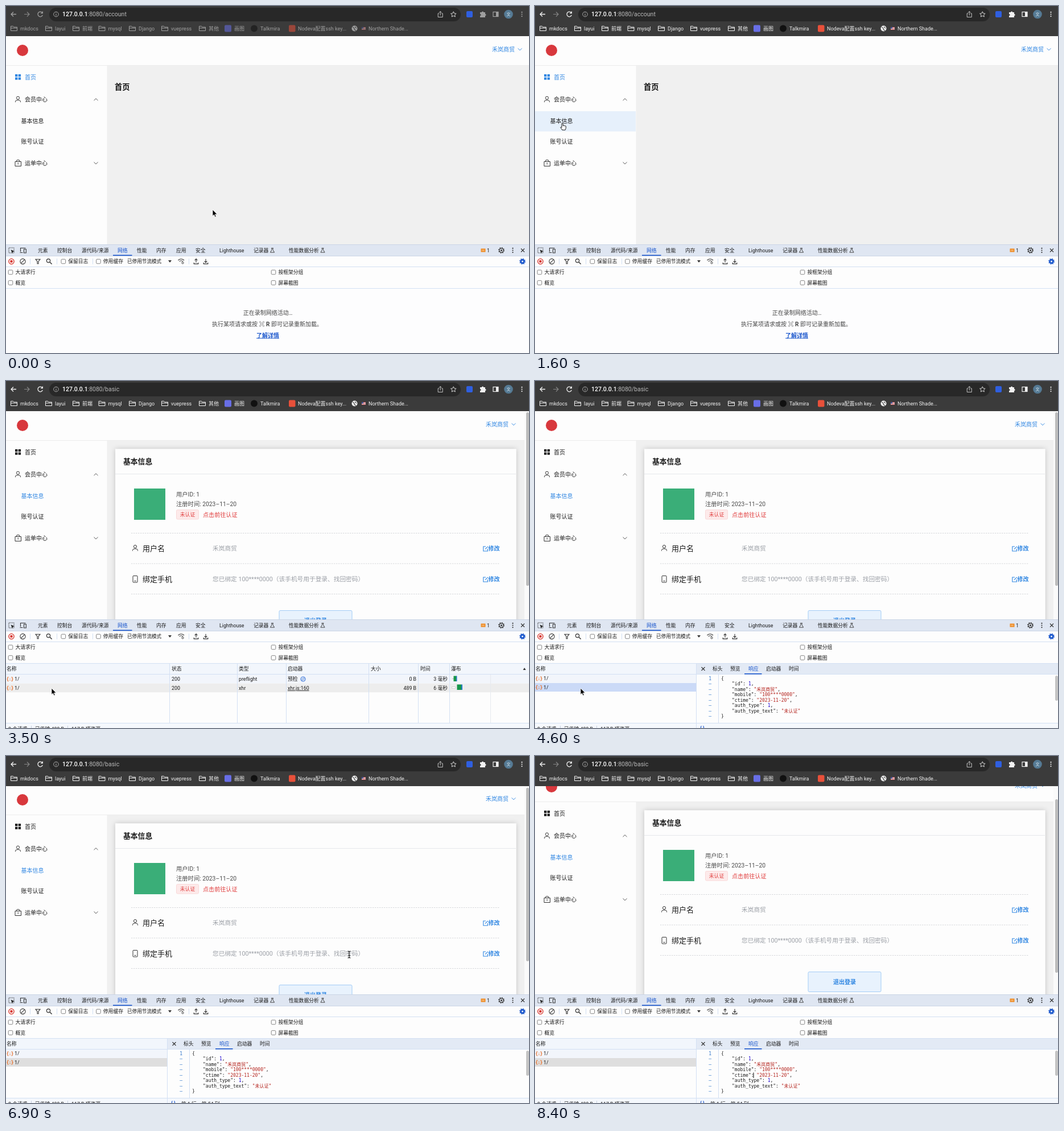
Write an HTML page that moves like this. It is 919x610 px and loops after 8500 ms.

```html
<!DOCTYPE html>
<html lang="zh-CN">
<head>
<meta charset="utf-8">
<title>Account page</title>
<style>
html, body { margin: 0; width: 100%; height: 100%; overflow: hidden; background: #fff; }
svg { display: block; }
text { font-family: Roboto, "Noto Sans CJK SC", "Noto Sans CJK", "DejaVu Sans", sans-serif; white-space: pre; }
.mono text { font-family: "DejaVu Sans Mono", "Noto Sans CJK SC", "Noto Sans CJK", monospace; }
</style>
</head>
<body>
<svg id="stage" width="919" height="610" viewBox="0 0 919 610"></svg>
<script>
const BLUE = '#2f86e2', DEV_BLUE = '#1a56cc', INK = '#1a1a1a', RULE = '#d3e0f3', PAPER = '#fdfdfd';
const COMPANY = '禾岚商贸', PHONE = '100****0000';
const LOOP = 8500, STEP = 100;

// Drawing helpers: text is placed by its vertical centre.
const text = (x, y, s, size = 8.8, fill = INK, extra = '') =>
  `<text x="${x}" y="${y + size * .36}" font-size="${size}" fill="${fill}" ${extra}>${s}</text>`;
const rect = (x, y, w, h, fill, extra = '') =>
  `<rect x="${x}" y="${y}" width="${w}" height="${h}" fill="${fill}" ${extra}/>`;
const line = (d, stroke = INK, width = 1, extra = '') =>
  `<path d="${d}" fill="none" stroke="${stroke}" stroke-width="${width}" ${extra}/>`;
const shape = (d, fill) => `<path d="${d}" fill="${fill}"/>`;
const circle = (x, y, r, fill, extra = '') => `<circle cx="${x}" cy="${y}" r="${r}" fill="${fill}" ${extra}/>`;
const ring = (x, y, r, stroke, width = 1) => circle(x, y, r, 'none', `stroke="${stroke}" stroke-width="${width}"`);
const group = (id, body, extra = '') => `<g id="${id}" ${extra}>${body}</g>`;
const BOLD = 'font-weight="700"', MEDIUM = 'font-weight="500"';
const END = 'text-anchor="end"', MIDDLE = 'text-anchor="middle"';

const chevron = (x, y, dir, color) => line(`M${x - 3.5} ${y - 1.6 * dir}l3.5 ${3.4 * dir}l3.5 ${-3.4 * dir}`, color, .9);
const cross = (x, y) => line(`M${x - 3} ${y - 3}l6 6m0-6l-6 6`, '#333', 1.1);
const person = (x, y) => ring(x, y - 2.4, 2.6, '#333') + line(`M${x - 4.5} ${y + 5.2}v-1q0-2.6 3-2.6h3q3 0 3 2.6v1`, '#333');
const gear = (x, y, color, body = 'none') => circle(x, y, 3.6, body, `stroke="${color}" stroke-width="1.3"`) +
  circle(x, y, 1.5, body === 'none' ? color : PAPER) +
  circle(x, y, 4.7, 'none', `stroke="${color}" stroke-width="1.4" stroke-dasharray="1.8 1.89"`);
const dots = (x, y, color) => [-3.6, 0, 3.6].map(d => circle(x, y + d, 1.05, color)).join('');
const checkbox = (x, y, label) => rect(x, y - 3.8, 7.6, 7.6, '#fff', 'rx="1.5" stroke="#777" stroke-width=".9"') +
  text(x + 12.2, y, label);
const flask = (x, y) => line(`M${x - 2} ${y - 3.7}h4m-3 0v3l-2.6 4.3h7.2l-2.6-4.3v-3`, '#333', .9);
const transfer = (x, y, up) => line(`M${x - 3.8} ${y + 2}v2.4h7.6v-2.4M${x} ${y + 2}v-6.3` +
  (up ? 'l-2.4 2.4m2.4-2.4l2.4 2.4' : `M${x - 2.4} ${y - .4}l2.4 2.4l2.4-2.4`), '#333', 1.1);

function browserBar() {
  const W = '#f1f1f1';
  const folders = [[8, 'mkdocs'], [69, 'layui'], [117, '前端'], [162.5, 'mysql'], [216, 'Django'], [273, 'vuepress'], [339, '其他']];
  const folder = ([x, label]) =>
    line(`M${x + .5} 43.5v-8h4l1.3 1.6h5.7v6.4zM${x + .5} 38.8h11`, W) + text(x + 17, 39.5, label, 9, W);
  const controls =
    line('M18 14.5h-9m4-4l-4 4l4 4', W, 1.3) +
    line('M64 12.3a4.3 4.3 0 1 0 .3 3.7M64.3 9.5v3.2h-3.2', W, 1.3) +
    shape('M833 11h3a1.6 1.6 0 0 1 3.2 0h2.8v3a1.6 1.6 0 0 1 0 3.2v2.8h-9v-2.8a1.6 1.6 0 0 0 0-3.2z', W) +
    rect(856, 10.5, 9, 8, 'none', `stroke="${W}" stroke-width="1.2"`) + rect(861, 10.5, 4, 8, W) +
    dots(906.5, 14.5, W) + folders.map(folder).join('') +
    rect(384, 33.5, 12, 12, '#686ee6', 'rx="2"') + text(401, 39.5, '画图', 9, W) +
    circle(436, 39.5, 6, '#111') + text(447, 39.5, 'Talkmira', 9, W) +
    rect(497, 33.5, 11.5, 12, '#e8503a', 'rx="2"') + text(513, 39.5, 'Nodeva配置ssh key...', 9, W) +
    circle(612.5, 39.5, 5, W) + line('M609 37q3 1 3 3t3 3m-1-7q-1 2 2 3', '#444', 1.2) +
    rect(625, 37, 7, 5, '#e9dede') + line('M625 37.5h7m-7 2h7m-7 2h7', '#c84850', .9) + rect(625, 37, 3, 2.6, '#465a9c') +
    text(637, 39.5, 'Northern Shade...', 9, W);
  return rect(0, 0, 919, 53, '#3b3b3b') + rect(76, 3, 723, 24, '#282828', 'rx="12"') +
    line('M32 14.5h9m-4-4l4 4l-4 4', '#858585', 1.2) + group('controls', controls) +
    ring(88, 14.5, 4.3, '#aaa') + line('M88 14v3m0-5.2v1', '#aaa', 1.1) +
    `<text x="99" y="18.2" font-size="10.5" fill="#b8b8b8"><tspan fill="#fff" ${MEDIUM}>127.0.0.1</tspan>:8080<tspan id="path"></tspan></text>` +
    line('M761 13h-1.8v6.5h8v-6.5h-1.8m-2.2 3.5v-7m-2.2 2.2l2.2-2.2l2.2 2.2', '#c5c5c5') +
    line('M786.3 9.8l1.4 3.1l3.4.4l-2.5 2.3l.7 3.4l-3-1.7l-3 1.7l.7-3.4l-2.5-2.3l3.4-.4z', '#d5d5d5') +
    rect(809, 9, 11, 11, '#2f5fe0', 'rx="2"') +
    circle(883, 14.5, 7.8, '#557a94') + text(883, 14.5, '文', 7, '#dde7ee', MIDDLE);
}

function sidebar() {
  return rect(0, 105, 177, 420, PAPER) + rect(0, 185, 177, 35.5, '#e6f0fb', 'id="hover"') +
    group('homeItem', [[16, 120], [21.7, 120], [16, 125.5], [21.7, 125.5]].map(([x, y]) => rect(x, y, 4.4, 4.2, 'currentColor')).join('') +
      text(33, 125, '首页', 10, 'currentColor')) +
    person(21, 164) + text(33, 164.5, '会员中心', 10) + chevron(158, 164.5, -1, '#444') +
    group('basicItem', text(26.5, 202.5, '基本信息', 10, 'currentColor')) + text(26.5, 238.5, '账号认证', 10) +
    line('M16 273.5h10.5v8h-10.5zM18 273.5l1.2-2.7h4l1.2 2.7M21.2 275.5v3.2', '#333') +
    text(33, 276.5, '运单中心', 10) + chevron(158, 276, 1, '#444');
}

function card() {
  const GREY = '#9b9fa6', BODY = '#4a4a4a', RED = '#e03c3c';
  const note = '（该手机号用于登录、找回密码）';
  const dash = y => line(`M220 ${y}H868`, '#d5d7da', 1, 'stroke-dasharray="2.4 1.6"');
  const edit = y => line(`M843 ${y - 3.5}h-4.2v8h7.6v-4m-4.4.6l4.8-4.8`, BLUE, 1.1) + text(847.5, y, '修改', 10, BLUE, BOLD);
  return rect(192, 119.5, 704.5, 420, PAPER, 'filter="url(#shadow)"') +
    text(206, 141.5, '基本信息', 12.8, INK, BOLD) + line('M192 163.5H896', '#e6e8eb') +
    rect(225, 189, 55, 55, '#3aae78') +
    group('empty', text(299, 199, '用户ID:', 10.3, BODY) + text(299, 216.5, '注册时间:', 10.3, BODY) +
      rect(299, 227, 14, 16, '#fdeaea', 'rx="2"') + text(320, 235, '点击前往认证', 10.1, RED) +
      text(363, 348.5, '您已绑定 ' + note, 10.7, GREY)) +
    group('filled', text(299, 199, '用户ID: 1', 10.3, BODY) + text(299, 216.5, '注册时间: 2023–11–20', 10.3, BODY) +
      rect(299.5, 226.5, 39, 16.5, '#fdeaea', 'rx="2" stroke="#f9d8d8"') + text(319, 235, '未认证', 8.8, RED, MIDDLE) +
      text(346, 235, '点击前往认证', 10.1, RED) +
      text(363, 294.5, COMPANY, 10.7, GREY) + text(363, 348.5, `您已绑定 ${PHONE}${note}`, 10.7, GREY)) +
    dash(267.5) + person(227, 293.5) + text(240, 294.5, '用户名', 13) + edit(294.5) +
    dash(321) + rect(223, 342.5, 8, 11.5, 'none', 'stroke="#333" rx="1"') + line('M225.5 351.5h3', '#333') +
    text(240, 348.5, '绑定手机', 13) + edit(348.5) + dash(374.5) +
    rect(480, 403.5, 128, 35, '#e8f2fd', 'rx="2" stroke="#a3ccf6"') + text(544, 421, '退出登录', 10, BLUE, `${MIDDLE} ${BOLD}`) +
    group('mask', rect(192, 119.5, 704.5, 420, PAPER, 'fill-opacity=".9"') +
      `<g id="spinner"><circle id="arc" r="12.4" fill="none" stroke="${BLUE}" stroke-width="1.5" stroke-linecap="round" pathLength="125.6"/></g>`);
}

function page() {
  return rect(0, 53, 919, 500, PAPER) + rect(177.5, 104, 741.5, 420, '#f0f0f0') + line('M0 104.5H919', '#ececec') +
    circle(29, 78, 10, '#d8383d') +
    group('account', text(854, 76.5, COMPANY, 10, BLUE) + chevron(903, 76, 1, BLUE)) + sidebar() +
    group('home', text(191, 142, '首页', 13.2, '#111', BOLD)) + group('basic', card());
}

function devTools() {
  const tabs = [[56, '元素'], [90, '控制台'], [133, '源代码/来源'], [230, '性能'], [264, '内存'], [299, '应用'], [333, '安全'],
    [375, 'Lighthouse'], [435, '记录器'], [497, '性能数据分析']];
  return rect(0, 419, 919, 191, PAPER) + rect(0, 419, 919, 20.5, '#dfe6f2') + line('M0 419.5H919M0 439.5H919', '#cbd5e6') +
    rect(5, 425, 9, 9, 'none', 'stroke="#333" stroke-dasharray="1.6 1.2"') + shape('M8.5 428.5l6.5 2.5l-2.7 1.1l-1.2 2.8z', '#222') +
    line('M24.5 433.5h5m-4-1.5v-6.5h9M31.5 427.5h3.8v6.5h-3.8z', '#333', 1.1) +
    tabs.map(([x, s]) => text(x, 429.5, s)).join('') + text(196, 429.5, '网络', 8.8, DEV_BLUE, MEDIUM) +
    rect(188, 437.5, 33.5, 1.6, DEV_BLUE) + flask(468, 429.5) + flask(556.5, 429.5) +
    rect(834.5, 426.5, 8, 6, '#ef8a20') + line('M837 428.3v2.4m2.6-2.4v2.4', '#fff', .8) + text(845, 430, '1') +
    gear(870.5, 429.5, '#333') + dots(890.5, 429.5, '#333') + cross(908, 429.5) +
    ring(9.5, 449, 4.6, '#d5281f', 1.3) + rect(7.5, 447, 4, 4, '#d5281f') +
    ring(29.5, 449, 4.6, '#333', 1.1) + line('M26.3 452.2l6.4-6.4', '#333', 1.1) +
    line('M52 445.2h8l-3 3.8v4h-2v-4z', '#333', 1.1) + ring(74.5, 447.8, 3.1, '#333', 1.2) + line('M77 450.2l3.6 3.6', '#333', 1.4) +
    line('M42.5 444v10M89.5 444v10M152.5 444v10M321.5 444v10', RULE) +
    checkbox(97, 449, '保留日志') + checkbox(158.6, 449, '停用缓存') + text(213, 449, '已停用节流模式', 8.6) +
    shape('M285 447h6l-3 4z', '#333') + line('M302.5 447q5-4.5 10.5 0m-8.5 2.2q3.3-2.8 6.5 0', '#333', 1.1) + ring(310.5, 451.5, 1.6, '#333') +
    transfer(334, 449, true) + transfer(351, 449, false) + gear(907.5, 449, DEV_BLUE, DEV_BLUE) +
    line('M0 458.5H919M0 496.5H919', RULE) +
    checkbox(4.2, 468, '大请求行') + checkbox(466.2, 468, '按框架分组') + checkbox(4.2, 486.5, '概览') + checkbox(466.2, 486.5, '屏幕截图') +
    group('idle', rect(0, 497, 919, 113, '#fdfdfe') + text(460, 539, '正在录制网络活动…', 10, '#444', MIDDLE) +
      text(459, 559, `执行某项请求或按 <tspan ${BOLD}>⌘ R</tspan> 即可记录重新加载。`, 10, '#444', MIDDLE) +
      text(460, 579, '了解详情', 10, DEV_BLUE, `${MIDDLE} ${BOLD} text-decoration="underline"`)) +
    group('requests', requestTable()) + group('details', detailPane());
}

const fileIcon = y => line(`M4.5 ${y - 3.5}q-2.5 0-1.5 2.4q0 1.1-1.5 1.1q1.5 0 1.5 1.1q-1 2.4 1.5 2.4m5-7q2.5 0 1.5 2.4q0 1.1 1.5 1.1q-1.5 0-1.5 1.1q1 2.4-1.5 2.4M7 ${y - 1.5}v1m0 1.5v1.6`, '#e8702a', 1.1);
const STRIPE = '#f2f5fb';

function requestTable() {
  const heads = [[1, '名称'], [291, '状态'], [409, '类型'], [495, '启动器'], [641, '大小'], [728, '时间'], [782, '瀑布']];
  const row = (y, type, size, time) => fileIcon(y) + text(15, y, '1/') + text(291, y, '200') + text(409, y, type) +
    text(721, y, size, 8.8, INK, END) + text(776, y, time, 8.8, INK, END);
  return rect(0, 497, 919, 18.5, '#f2f6fc') + rect(0, 516, 919, 15.8, STRIPE) + rect(0, 531.8, 919, 15.5, '#ededed', 'id="row"') +
    line('M0 515.5H919M287.5 497V601M406.5 497V601M492.5 497V601M637.5 497V601M724.5 497V601M779.5 497V601', RULE) +
    line('M851.5 516V601', '#e6e9ee') + heads.map(([x, s]) => text(x, 506.3, s)).join('') + shape('M908.5 508h5l-2.5-4z', '#333') +
    row(524, 'preflight', '0 B', '3 毫秒') + row(539.7, 'xhr', '489 B', '6 毫秒') +
    text(495, 524, '预检') + ring(522, 524, 4, '#3a76d8', 1.1) + line('M519.5 522.8h5l-1.5-1.4m1.5 3.8h-5l1.5 1.4', '#3a76d8', .8) +
    text(495, 539.7, 'xhr.js:160', 8.8, INK, 'text-decoration="underline"') +
    line('M784 523.5h3', '#bbb') + rect(786.5, 518.5, 5, 9.5, '#16964a') + rect(791, 518.5, 1.5, 9.5, '#2b7cc9') +
    rect(783.5, 537.5, 6, 3, '#fff', 'stroke="#ccc" stroke-width=".8"') + rect(792.5, 533.5, 7.5, 9.5, '#16964a') + rect(800, 533.5, 2, 9.5, '#2b7cc9') +
    rect(0, 602, 919, 8, '#f5f8fd') + line('M0 601.5H919', RULE) +
    text(4, 611.5, '2 个请求') + text(51, 611.5, '已传输 489 B') + text(115, 611.5, '117 B 项资源') + line('M44.5 606v4M108.5 606v4', '#c5cede');
}

function detailPane() {
  const tabs = [[312, '标头'], [343, '预览'], [406, '启动器'], [446, '时间']];
  const str = s => `<tspan fill="#b3201a">"${s}"</tspan>`;
  const num = n => `<tspan fill="#1c00cf">${n}</tspan>`;
  const fields = [['id', num(1)], ['name', str(COMPANY)], ['mobile', str(PHONE)], ['ctime', str('2023-11-20')], ['auth_type', num(1)], ['auth_type_text', str('未认证')]];
  const lineY = i => 523 + i * 9.47;
  const json = text(327, lineY(0), '{', 8) + text(327, lineY(7), '}', 8) +
    fields.map(([key, value], i) => text(346, lineY(i + 1), `"${key}": ${value}${i < 5 ? ',' : ''}`, 8)).join('');
  const gutter = [...'1–––––––'].map((s, i) => text(310, lineY(i), s, 8, '#2a72c8', END)).join('');
  return rect(0, 516, 283, 85, PAPER) + rect(0, 516, 283, 15, STRIPE) + rect(0, 531, 283, 15, '#cbdaf7', 'id="selected"') +
    fileIcon(523.3) + text(15, 523.3, '1/') + fileIcon(538.6) + text(15, 538.6, '1/') +
    rect(283, 497, 636, 113, PAPER) + rect(283, 497, 636, 18.5, '#e3eaf5') + line('M283 515.5H919M283 601.5H919M283.5 497V610M322.5 516V601', RULE) +
    cross(295.5, 506) + tabs.map(([x, s]) => text(x, 506.3, s)).join('') + text(375, 506.3, '响应', 8.8, DEV_BLUE, MEDIUM) + rect(368, 514, 30.5, 1.6, DEV_BLUE) +
    rect(284, 537.5, 30, 9, '#e6e6e6', 'id="gutterHover" rx="2"') + group('code', gutter + json, 'class="mono"') +
    rect(383.5, 556.5, 1, 9.5, '#000', 'id="caret"') + rect(914, 518, 5, 44, '#c4c4c4', 'rx="2.5"') +
    rect(284, 602, 635, 8, '#f5f8fd') + text(290, 610, '{ }', 8.8, DEV_BLUE, BOLD) + group('position', text(308, 611.5, '第 1 行，第 54 列'));
}

const cursors =
  group('arrow', `<path d="M0 0v11.3l2.6-2.4l1.8 4.2l1.9-.8l-1.8-4.1h3.5z" fill="#000" stroke="#fff" stroke-width=".8"/>`) +
  group('hand', `<path d="M-1 .8q1.3-1.6 2.2.2v3.6q.8-1 1.8 0q1-.8 1.7.2q1.4-.5 1.6.8v3q-.6 2-1.2 3.4h-5.2q-1-2.2-3.2-4.4q.4-1.6 2.3 0z" fill="#fff" stroke="#000" stroke-width=".9"/>`) +
  group('ibeam', line('M-2.5-6q2 0 2.5 1.2q.5-1.2 2.5-1.2M-2.5 6q2 0 2.5-1.2q.5 1.2 2.5 1.2M0-5v10M-1.5 1.5h3', '#111', 1.1));

const stage = document.getElementById('stage');
stage.innerHTML = `<defs><clipPath id="view"><rect y="53" width="919" height="366"/></clipPath>
  <filter id="shadow" x="-5%" y="-5%" width="110%" height="110%"><feDropShadow dx="0" dy="0" stdDeviation="4" flood-color="#000" flood-opacity=".2"/></filter></defs>
  <g clip-path="url(#view)">${group('page', page())}${group('scrollbar', rect(911, 53, 8, 366, '#fafafa') + rect(914, 55, 5, 305, '#bcbcbc', 'rx="2.5" id="thumb"'))}</g>` +
  browserBar() + devTools() + group('pointer', cursors);
const el = Object.fromEntries([...stage.querySelectorAll('[id]')].map(node => [node.id, node]));

const clamp = v => Math.max(0, Math.min(1, v));
const smooth = v => v * v * (3 - 2 * v);
const show = (name, on) => el[name].setAttribute('display', on ? 'inline' : 'none');
const move = (name, x, y) => el[name].setAttribute('transform', `translate(${x} ${y})`);

// Event times in ms
const FOCUS = 600, NAVIGATE = 1700, LOADED = 2700, SELECT = 4500, OPEN = 4600, CLICK = 5800, SCROLL = 6800, SCROLLED = 7200;
const route = [[0, 363, 358], [300, 363, 358], [1500, 48, 206], [1750, 48, 206], [2600, 234, 262], [2700, 234, 262], [3500, 80, 540],
  [4700, 80, 540], [5400, 324, 549], [5800, 384, 561], [6000, 384, 561], [6800, 603, 349], [LOOP, 603, 349]];

function pointerAt(t) {
  const i = route.findIndex(([end]) => end > t);
  const [t0, x0, y0] = route[i - 1], [t1, x1, y1] = route[i];
  const k = smooth((t - t0) / (t1 - t0));
  return [x0 + (x1 - x0) * k, y0 + (y1 - y0) * k];
}

function drawSpinner(t) {
  const age = Math.max(0, t - NAVIGATE + 50), p = age % 1500 / 1500;
  const first = smooth(clamp(p * 2)), second = smooth(clamp(p * 2 - 1));
  el.arc.setAttribute('stroke-dasharray', `${1 + 89 * first} 200`);
  el.arc.setAttribute('stroke-dashoffset', -40 * first - 80 * second);
  el.spinner.setAttribute('transform', `translate(544 296) rotate(${age * .18})`);
}

function render(t) {
  const [x, y] = pointerAt(t), basic = t >= NAVIGATE, loaded = t >= LOADED;
  const scroll = Math.round(24 * clamp((t - SCROLL) / (SCROLLED - SCROLL)) ** 2.3);

  el.controls.setAttribute('opacity', t < FOCUS ? .55 : 1);
  el.path.textContent = basic ? '/basic' : '/account';
  move('page', 0, -scroll);
  move('thumb', 0, scroll * .87);
  move('account', basic ? -11 : 0, 0);
  show('scrollbar', basic);
  show('home', !basic);
  show('basic', basic);
  el.homeItem.setAttribute('color', basic ? INK : BLUE);
  el.basicItem.setAttribute('color', basic ? BLUE : INK);
  show('hover', x < 177 && y > 185 && y < 220);

  show('empty', !loaded);
  show('filled', loaded);
  el.mask.setAttribute('opacity', clamp((t - NAVIGATE + 100) / 300) * (1 - clamp((t - LOADED) / 300)));
  drawSpinner(t);

  show('idle', !loaded);
  show('requests', loaded);
  show('row', y > 532 && y < 547);
  el.row.setAttribute('fill', t < SELECT ? '#ededed' : '#cbdaf7');
  show('details', t >= OPEN);
  el.selected.setAttribute('fill', t < CLICK ? '#cbdaf7' : '#dedede');
  show('gutterHover', t >= 5200 && t < 5500);
  show('position', t >= CLICK);
  show('caret', t >= CLICK && (t - CLICK) % 1200 < 600);

  const kind = x < 177 && y > 105 && y < 290 ? 'hand' : t > 5400 && (y > 517 || t >= 6700) ? 'ibeam' : 'arrow';
  for (const name of ['arrow', 'hand', 'ibeam']) show(name, name === kind);
  show('pointer', t < SCROLLED);
  move('pointer', x, y);
}

function tick(now) {
  render(Math.floor(now % LOOP / STEP) * STEP);
  requestAnimationFrame(tick);
}
render(0);
requestAnimationFrame(tick);
</script>
</body>
</html>
```
